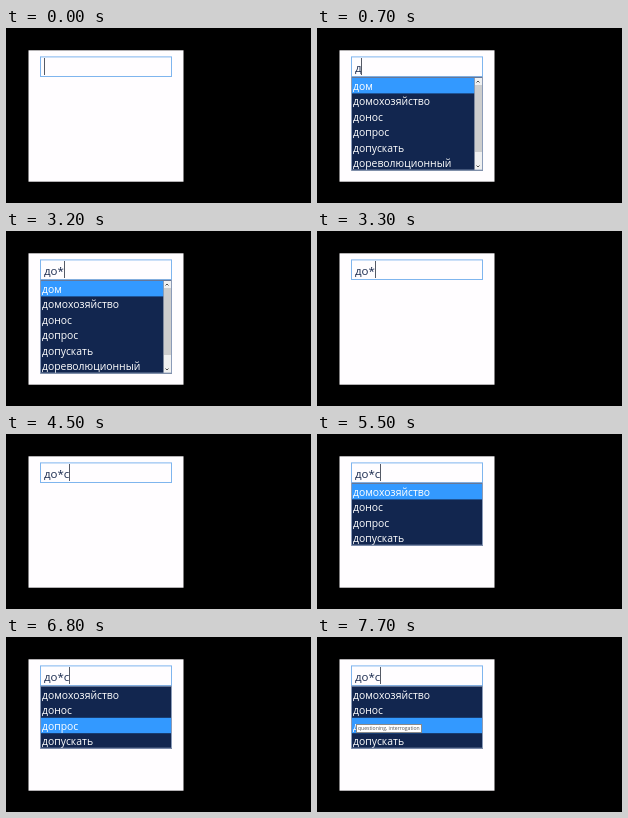
An HTML page with a canvas for the animation above (8000 ms loop, 305 px wide and 175 px high).

```html
<!DOCTYPE html>
<html lang="ru">
<head>
<meta charset="utf-8">
<style>
html, body { margin: 0; width: 100%; height: 100%; overflow: hidden; background: #000; }
canvas { display: block; width: 305px; height: 175px; }
</style>
</head>
<body>
<canvas id="stage"></canvas>
<script>
const LOOP = 8000, ROW = 15.4, TOP = 50;
const FONT = '"Open Sans", "Noto Sans", sans-serif';
const WORDS = ['дом', 'домохозяйство', 'донос', 'допрос', 'допускать', 'дореволюционный'];
const MATCHES = WORDS.slice(1, 5);
const TYPED = [[0, ''], [400, 'д'], [1800, 'до'], [3100, 'до*'], [4500, 'до*с']];
const CARET = [[0, 1], [1000, 0], [1500, 1], [2300, 0], [2800, 1], [3600, 0], [4100, 1],
  [5000, 0], [5500, 1], [6100, 0], [6600, 1], [7100, 0], [7700, 1]];
const LIST = [[0, null], [700, WORDS], [3300, null], [4700, MATCHES]];
const PICK = [[0, 0], [6300, 1], [6700, 2]];

const canvas = document.getElementById('stage');
const ctx = canvas.getContext('2d');
const dpr = window.devicePixelRatio || 1;
canvas.width = 305 * dpr;
canvas.height = 175 * dpr;
ctx.scale(dpr, dpr);

const at = (track, t) => track.filter(([start]) => start <= t).pop()[1];

function box(x, y, w, h, fill) {
  ctx.fillStyle = fill;
  ctx.fillRect(x, y, w, h);
}

function frame(x, y, w, h, color) {
  ctx.strokeStyle = color;
  ctx.lineWidth = 1;
  ctx.strokeRect(x + .5, y + .5, w - 1, h - 1);
}

function label(text, x, y, size, color, weight = 400) {
  ctx.font = `${weight} ${size}px ${FONT}`;
  ctx.fillStyle = color;
  ctx.fillText(text, x, y);
}

function drawInput(text, caret) {
  frame(34, 28.4, 132, 20.6, '#7fb5ee');
  label(text, 38, 44, 11.5, '#1c2c50', 500);
  if (caret) box(Math.floor(38.3 + ctx.measureText(text).width), 30, 1, 17, '#555a66');
}

function arrow(y, dir) {
  ctx.strokeStyle = '#505050';
  ctx.beginPath();
  ctx.moveTo(159.5, y + dir);
  ctx.lineTo(161, y - dir * .5);
  ctx.lineTo(162.5, y + dir);
  ctx.stroke();
}

function drawScrollbar() {
  box(157.5, 50, 7.5, 92, '#f0f0f0');
  box(158, 57, 7, 67, '#cdcdcd');
  arrow(53.5, 1);
  arrow(138.5, -1);
}

function drawList(items, pick) {
  const long = items.length > 4;
  const bottom = long ? 142.6 : 111.7;
  const width = long ? 123 : 131;
  box(34.3, 49, 131.7, bottom - 49, '#12264f');
  box(34.3, TOP + pick * ROW, width, ROW, '#3399ff');
  items.forEach((word, i) => label(word, 36, 62 + i * ROW, 10.4, '#fff'));
  if (long) drawScrollbar();
  frame(34, 48.7, 132, bottom - 48.7, '#8b9bb8');
}

function drawTip(alpha) {
  ctx.globalAlpha = alpha;
  box(39, 87, 66, 9, '#fff');
  frame(39, 87, 66, 9, '#8a8a8a');
  label('questioning, interrogation', 41, 93.3, 5.1, '#555');
  ctx.globalAlpha = 1;
}

function draw(t) {
  box(0, 0, 305, 175, '#000');
  box(22.5, 22.3, 155, 131.4, '#fffdff');
  drawInput(at(TYPED, t), at(CARET, t));
  const items = at(LIST, t);
  if (items) drawList(items, at(PICK, t));
  if (t >= 7000) drawTip(t < 7100 ? .6 : 1);
}

const start = performance.now();
function tick() {
  draw((performance.now() - start) % LOOP);
  requestAnimationFrame(tick);
}
tick();
</script>
</body>
</html>
```
